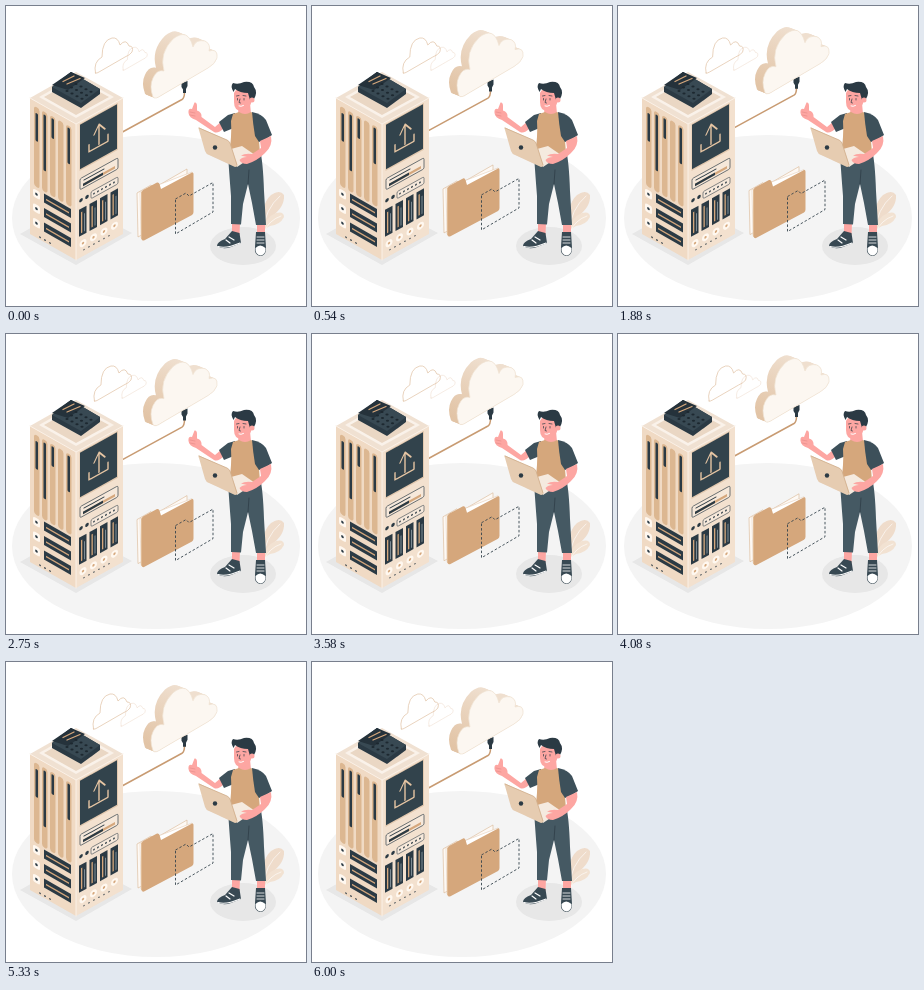
Animation, 300 px wide and 300 px high, one loop 6040 ms. Source, as an HTML page:

```html
<!DOCTYPE html>
<html lang="en">
<head>
<meta charset="utf-8">
<title>Cloud upload</title>
<style>
html, body { margin: 0; width: 100%; height: 100%; overflow: hidden; background: #fff; }
svg { display: block; width: 100vw; height: 100vh; }
.dark { fill: #2b3a44; }
.cloth { fill: #3d505a; }
.tan { fill: #d5a77c; }
.skin { fill: #fda6a2; }
.line { fill: none; stroke-linecap: round; stroke-linejoin: round; }
</style>
</head>
<body>
<svg viewBox="0 0 300 300">
  <defs>
    <path id="puff" d="M147 91Q143 80 147 72Q151 63 158 65Q153 47 167 33Q182 21 187 41Q190 33 199 35Q205 38 203 45Q212 42 211 52Q209 58 202 62L156 89Q149 94 147 91Z"/>
    <path id="wisp" d="M89.500 67Q87 56 96 51Q96 34 106 32Q112 31 114 39Q120 32 123 40Q128 40 126 46Q124 49 119 51L93 66Q91 67.500 89.500 67Z"/>
    <linearGradient id="shade" gradientUnits="userSpaceOnUse" x1="140" y1="82" x2="176" y2="28">
      <stop stop-color="#e2c4a6"/>
      <stop offset="1" stop-color="#efdfcf"/>
    </linearGradient>
  </defs>

  <ellipse cx="150" cy="212" rx="144" ry="83" fill="#f4f4f4"/>
  <path d="M14 228L69 197L126 227L70 259Z" fill="#e7e7e7"/>
  <ellipse cx="237" cy="240" rx="33" ry="19" fill="#e7e7e7"/>

  <g id="wisps" class="line" stroke="#e4c8ae" stroke-width=".8">
    <use href="#wisp"/>
    <use href="#wisp" transform="translate(59 20.500) scale(.65)" opacity=".65"/>
  </g>

  <g id="cloud">
    <path class="line" d="M100 135L176 93.500Q178.500 92 178.500 86" stroke="#c89b72" stroke-width="1.500"/>
    <path class="dark" d="M175.500 77L181.500 75V80L180 83V87H177V83.500L175.500 81Z"/>
    <g id="rim" fill="url(#shade)"></g>
    <use href="#puff" fill="#fcf7f1" stroke="#f0e2d3" stroke-width=".7"/>
  </g>

  <!-- server -->
  <path fill="#f0e1d2" d="M24 92L70 66L117 92L70 119Z"/>
  <path fill="#faf2ea" d="M33 91L70 70L108 91L70 112Z"/>
  <path fill="#ead7c4" d="M38 91L70 73L103 91L70 109Z"/>
  <path fill="#f0dac4" d="M24 92L70 118V254L24 228Z"/>
  <path fill="#f3e1cf" d="M70 118L117 92V228L70 254Z"/>
  <path class="line" d="M24 92L70 118L117 92M70 118V254" stroke="#fbf1e7" stroke-width="1"/>
  <g id="left" transform="matrix(1 .578 0 1 25 92)"></g>
  <g id="right" transform="matrix(1 -.553 0 1 70 118)">
    <rect x="3.500" y="2" width="38.500" height="47" fill="#e3c9af"/>
    <rect x="4" y="3" width="37" height="44.500" fill="#32434c"/>
    <path class="line" d="M23 33V13M18 21L23 13L29 21M13 28V35H32V28" stroke="#e6c5a3" stroke-width="1.400"/>
    <rect x="4" y="57" width="38" height="11" rx="1.500" fill="#f6e8da" stroke="#2b3a44" stroke-width=".6"/>
    <path class="line" d="M8 60.500H28" stroke="#2b3a44"/>
    <rect class="tan" x="7" y="63.500" width="32" height="2.500"/>
    <rect class="dark" x="7" y="63.500" width="20" height="2.500"/>
    <rect x="15" y="76" width="27" height="7" rx="1.500" fill="#f6e8da" stroke="#2b3a44" stroke-width=".5"/>
  </g>
  <path class="dark" d="M46 81L65 66L94 83V88L75 102L46 86Z"/>
  <path fill="#384953" d="M46 81L65 66L94 83L75 97Z"/>
  <path fill="#25323b" d="M46 79L65 66L79 72L62 84Z"/>
  <path class="line" d="M57 75.500L68 70M61 78L74 72.500" stroke="#d5a77c" stroke-width="1.300"/>
  <g id="keys" fill="#1d2830"></g>

  <!-- folder and its outline -->
  <g id="folder">
    <path d="M131 187L145 179L148 182L181 163V204L132 231Z" fill="#fdf9f5" stroke="#d9b592" stroke-width=".6"/>
    <path fill="#fff" stroke="#e0c5aa" stroke-width=".5" d="M134 186L186 166V206L135 232Z"/>
    <path fill="#e0bb95" d="M135 186L137 185V234.500L135 233Z"/>
    <path class="tan" d="M136 186Q136 185 137 184L151 176.500Q153 176 153.500 178L155 183L186 166.500Q187.500 166 187.500 168V206Q187.500 208 186 209L138 234.500Q136 235 136 233Z"/>
    <path class="line" d="M169.500 193L180 187L183 190L207 176.500V206L169.500 228Z" stroke="#35434c" stroke-width=".9" stroke-dasharray="2.500 2" style="stroke-linecap:butt"/>
  </g>

  <!-- plant -->
  <path fill="#efdccb" d="M256 226Q254 199 265 189Q274 183 278 189Q279 201 265 211Q259 216 258 226Z"/>
  <path fill="#f2e2d2" d="M257 226Q259 211 270 207Q278 205 278 211Q274 219 264 220Q259 222 258 227Z"/>
  <path class="line" d="M257 225Q259 203 274 190M258 226Q263 214 275 210" stroke="#fff" stroke-width=".6"/>

  <!-- legs and shoes -->
  <path class="skin" d="M226 217H234L233.500 229L226 229ZM251 218H259V229H251Z"/>
  <path fill="#455963" d="M222 148L254 144Q257 155 258 185L260 219H250L246 197L242 178L237 198L235 218.500L225 218L225 190Q223 165 222 148Z"/>
  <path class="line" d="M242 178L243 164" stroke="#2b3a44" stroke-width=".7"/>
  <path fill="#384953" d="M226 225L233.500 227L235 237L225 241Q217 244 211 240Q211 236 219 233Z"/>
  <path class="line" d="M212 240.500Q220 243 234 237M220 234L224 237M223 231L228 234" stroke="#fff" stroke-width="1.200"/>
  <path fill="#384953" d="M250 226H259L260 242Q260 250 254 250Q248 249 249 241Z"/>
  <path fill="#fff" d="M249.500 242Q254 237 259.500 242Q260 249 254.500 249.500Q249 249 249.500 242Z"/>
  <path class="line" d="M251 231H258M251 234H258M251 237H258" stroke="#fff" stroke-width=".8"/>

  <!-- arm, torso and head -->
  <path class="skin" d="M217 114L209 121L195.500 111Q196 106 191 104.500L191 100Q191 96 188.500 96.500L186 103Q182 102 182.500 107Q183 112 190 114L208 126Q212 128 218 122Z"/>
  <path class="line" d="M184 106L189 107M184 109L189 110" stroke="#e58a86" stroke-width=".6"/>
  <path class="cloth" d="M229 107L222 109L213 116L218 126L230 121Z"/>
  <path class="skin" d="M233 97H244L245 108Q239 113 232 108Z"/>
  <path class="tan" d="M227 108L233 106Q239 110 245 106L251 109L254 147Q240 154 223 149Q226 130 225 115Z"/>
  <path class="cloth" d="M246 106Q256 108 260 114L266 129Q260 134 253 136L249 130Q247 118 246 106Z"/>
  <path class="skin" d="M228 87Q230 82 238 83Q247 85 246 94Q244 104 236 105Q228 105 228 96Z"/>
  <path class="dark" d="M227.500 86Q224 80 227 77Q232 79 238 76Q247 75 248 81Q252 86 248 93L244 94L242 87Q234 87 229 83Z"/>
  <circle class="skin" cx="246" cy="94" r="2.500"/>
  <path class="line" d="M230.500 90L233 89.500M237 89.500L240 90M231.500 92.500V94M238 92.500V94M234 93L233 96.500L234.500 97" stroke="#2b3a44" stroke-width=".7"/>
  <path class="line" d="M233 100Q235 101 237.500 99.500" stroke="#fff" stroke-width="1"/>

  <!-- laptop and the hand holding it -->
  <path fill="#f5eadf" d="M225 143L236 140L249 149L231 161Z"/>
  <path fill="#e6ccb1" d="M193 121.500Q192 122 193 124L199 145Q200 148 203 149L229 161Q232 161 231 158L224 137Q223 135 221 134Z"/>
  <path class="line" d="M193 122L221 134Q223 135 224 137L231 159" stroke="#d0ad8a" stroke-width=".8"/>
  <circle class="dark" cx="209" cy="141.500" r="2.200"/>
  <path class="skin" d="M254 135L265 130Q267 140 259 147Q251 155 241 158Q235 158 233.500 154Q236 151 241 151L235 149.500Q239 147 246 148L255 142Z"/>
</svg>
<script>
const LOOP = 6040;
const $ = id => document.getElementById(id);

function add(parent, tag, attrs) {
  const el = document.createElementNS("http://www.w3.org/2000/svg", tag);
  for (const key in attrs) el.setAttribute(key, attrs[key]);
  $(parent).appendChild(el);
}
const bar = (parent, x, y, width, height, fill, rx = 0) =>
  add(parent, "rect", { x, y, width, height, fill, rx });
const dot = (parent, cx, cy, r, fill) => add(parent, "circle", { cx, cy, r, fill });

const DARK = "#2b3a44", TAN = "#d5a77c", PALE = "#fff8f0";

for (let i = 8; i >= 0; i--)
  add("rim", "use", { href: "#puff", transform: `translate(${-i} ${-i * .4})` });

// vents: [start, length] of the dark part
[[12, 28], [9, 56], [8, 20], [0, 0], [8, 36]].forEach(([y, h], i) => {
  const x = 3 + i * 8;
  bar("left", x, 6, 5.5, 80, "#dcb791", 2.7);
  bar("left", x + 1.5, y, 2.5, h, DARK, 1);
});
for (let i = 0; i < 3; i++) {
  const y = 88 + i * 14.5;
  bar("left", 2, y + 1, 7, 8, PALE, 2);
  dot("left", 5.5, y + 5, 1.3, DARK);
  bar("left", 13, y, 27, 9, DARK);
  bar("left", 15, y + 4, 23, 1.5, TAN);
  dot("left", 9 + i * 5, 134, .8, DARK);
}

dot("right", 5, 79, 1.8, DARK);
dot("right", 11, 79, 1.8, DARK);
for (let i = 0; i < 6; i++) {
  dot("right", 18 + i * 4, 79.5, .9, DARK);
  dot("right", 8 + i * 5, 130, .7, DARK);
}
for (let i = 0; i < 4; i++) {
  const x = 3 + i * 10.5;
  bar("right", x, 87.5, 7.5, 27, DARK);
  bar("right", x + 2, 91, 1.3, 21, TAN);
  bar("right", x + 5, 94, 1, 18, "#7d8b93");
  dot("right", x + 4, 123, 3.5, PALE);
  dot("right", x + 4, 123, 1.2, TAN);
}
for (let r = 0; r < 3; r++)
  for (let c = 0; c < 4; c++)
    add("keys", "ellipse", { cx: 61 + c * 5 + r * 4.5, cy: 85 + c * 2.6 - r * 3.5, rx: 1.6, ry: 1 });

const lift = (t, period, height) => -height * (1 - Math.cos(2 * Math.PI * t / period)) / 2;
const move = (id, x, y) => $(id).setAttribute("transform", `translate(${x} ${y})`);

function draw(now) {
  const t = now % LOOP;
  move("cloud", 0, lift(t, LOOP / 2, 5));
  move("folder", 0, lift(t, LOOP / 4, 5));
  move("wisps", 2 * Math.sin(4 * Math.PI * t / LOOP), 0);
  requestAnimationFrame(draw);
}
draw(performance.now());
</script>
</body>
</html>
```
